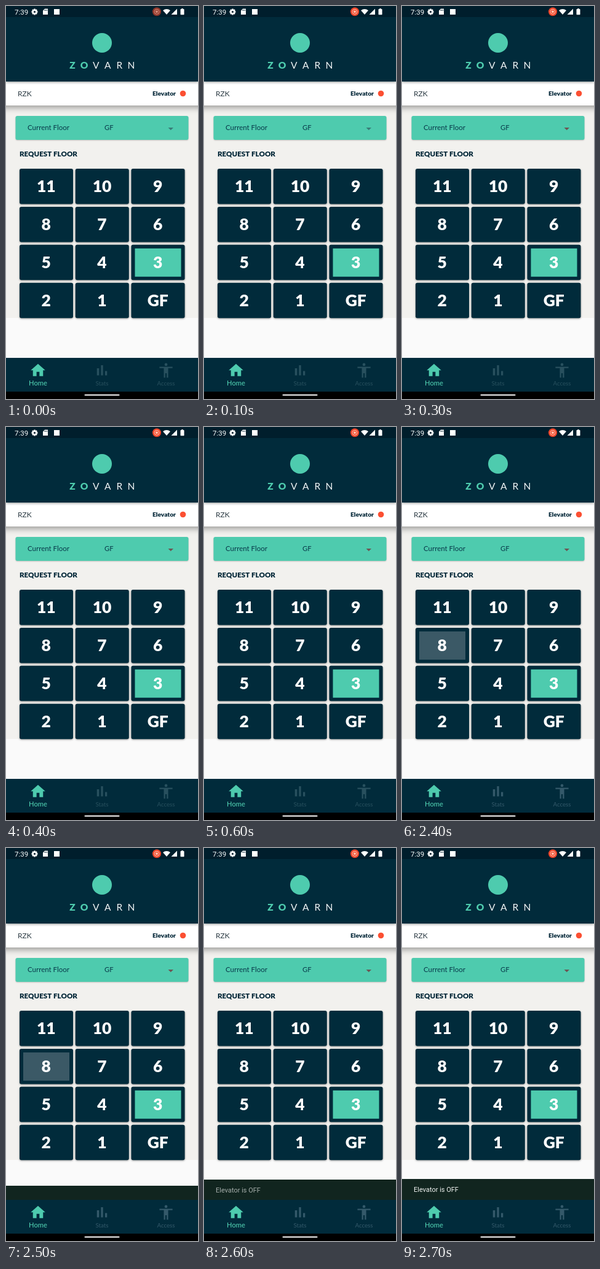
Recreate the animation shown at these times as an HTML page with a canvas. Size 312x640 px, loop 4 s.

```html
<!DOCTYPE html>
<html lang="en">
<head>
<meta charset="utf-8">
<title>Elevator panel</title>
<style>
  html, body { margin: 0; width: 100%; height: 100%; overflow: hidden; background: #012b3b; }
  canvas { display: block; width: 100vw; height: 100vh; }
</style>
</head>
<body>
<canvas id="stage" width="312" height="640"></canvas>
<script>
const ctx = document.getElementById('stage').getContext('2d');
const LOOP = 4000, STEP = 100;
const NAVY = '#012b3b', TEAL = '#4ecbae', ORANGE = '#fb4f32';
const LATO = 'Lato, sans-serif', ROBOTO = 'Roboto, sans-serif';
const KEYS = ['11', '10', '9', '8', '7', '6', '5', '4', '3', '2', '1', 'GF'];

const homeIcon = new Path2D('M10 20v-6h4v6h5v-8h3L12 3 2 12h3v8z');
const statsIcon = new Path2D('M5 9.2h3V19H5zM10.6 5h2.8v14h-2.8zM16.2 13H19v6h-2.8z');
const accessIcon = new Path2D('M12 2a2 2 0 1 1 0 4a2 2 0 1 1 0-4zM21 9h-6v13h-2v-6h-2v6H9V9H3V7h18z');

function rect(x, y, w, h, color) {
  ctx.fillStyle = color;
  ctx.fillRect(x, y, w, h);
}

function rounded(x, y, w, h, r, color) {
  ctx.fillStyle = color;
  ctx.beginPath();
  ctx.roundRect(x, y, w, h, r);
  ctx.fill();
}

function circle(x, y, r, color) {
  ctx.fillStyle = color;
  ctx.beginPath();
  ctx.arc(x, y, r, 0, Math.PI * 2);
  ctx.fill();
}

function polygon(color, ...points) {
  ctx.fillStyle = color;
  ctx.beginPath();
  points.forEach(([x, y]) => ctx.lineTo(x, y));
  ctx.fill();
}

function text(str, x, y, size, color, weight = 400, align = 'left', family = LATO) {
  ctx.font = `${weight} ${size}px ${family}`;
  ctx.textAlign = align;
  ctx.fillStyle = color;
  ctx.fillText(str, x, y);
}

function withShadow(blur, offset, alpha, draw) {
  ctx.save();
  ctx.shadowColor = `rgba(0,0,0,${alpha})`;
  ctx.shadowBlur = blur;
  ctx.shadowOffsetY = offset;
  draw();
  ctx.restore();
}

// Material standard curve: cubic-bezier(.4, 0, .2, 1)
function fastOutSlowIn(x) {
  if (x <= 0) return 0;
  if (x >= 1) return 1;
  const bezier = (a, b, u) => 3 * a * u * (1 - u) ** 2 + 3 * b * u * u * (1 - u) + u ** 3;
  let low = 0, high = 1;
  for (let i = 0; i < 24; i++) {
    const mid = (low + high) / 2;
    if (bezier(0.4, 0.2, mid) < x) low = mid; else high = mid;
  }
  return bezier(0, 1, low);
}

function drawGear(x, y) {
  ctx.save();
  ctx.translate(x, y);
  for (let i = 0; i < 4; i++) {
    rect(-1.3, -5, 2.6, 10, '#fff');
    ctx.rotate(Math.PI / 4);
  }
  ctx.restore();
  circle(x, y, 3.8, '#fff');
  circle(x, y, 1.6, '#001e2c');
}

function drawStatusBar(t) {
  rect(0, 0, 312, 18, '#001e2c');
  text('7:39', 14, 14, 11.5, '#fff', 400, 'left', ROBOTO);
  drawGear(46.5, 9.5);
  polygon('#fff', [63, 4.5], [68, 4.5], [68, 14], [60, 14], [60, 7.5]);
  for (let i = 0; i < 3; i++) rect(62.4 + i * 1.8, 6, 0.8, 2, '#001e2c');
  rect(78, 5, 9, 9, '#fff');

  ctx.globalAlpha = t < 100 ? 0.6 : 1;
  circle(245, 9.3, 7, '#f2472c');
  ctx.strokeStyle = '#ffc2ae';
  ctx.lineWidth = 1;
  ctx.beginPath();
  ctx.arc(245, 9.3, 4, 0, Math.PI * 2);
  ctx.stroke();
  circle(245, 9.3, 2, '#ffc2ae');
  ctx.globalAlpha = 1;

  ctx.fillStyle = '#fff';
  ctx.beginPath();
  ctx.moveTo(261, 14);
  ctx.arc(261, 14, 9, -Math.PI * 0.73, -Math.PI * 0.27);
  ctx.fill();
  polygon('#fff', [278, 4.5], [278, 14], [268.5, 14]);
  rounded(283.5, 5, 6, 9.3, 0.7, '#fff');
  rect(285.2, 4, 2.6, 1, '#fff');
}

function drawHeader() {
  withShadow(4, 1, 0.45, () => rect(0, 18, 312, 105, NAVY));
  circle(156, 60, 16, TEAL);
  [...'ZOVARN'].forEach((letter, i) => {
    const bold = i < 2;
    text(letter, 108 + i * 19.1, 102, 15.5, bold ? TEAL : '#f4f7f8', bold ? 900 : 400, 'center');
  });
}

function drawInfoBar() {
  withShadow(10, 3, 0.4, () => rect(-10, 122, 332, 40, '#fff'));
  text('RZK', 19, 147, 12, '#2c3b44');
  text('Elevator', 276, 146, 10.2, '#002536', 900, 'right');
  circle(287.5, 142.5, 4.8, ORANGE);
}

function drawFloorPicker(t) {
  withShadow(2, 1, 0.2, () => rounded(15.5, 179, 281, 39, 3, TEAL));
  text('Current Floor', 35, 202, 11.5, '#08394a');
  text('GF', 160, 202, 11.2, '#08394a');
  polygon(t < 300 ? '#397d78' : '#6d5654', [263.5, 198], [272, 198], [267.75, 202.3]);
  text('REQUEST FLOOR', 22, 245, 11.6, '#002536', 900);
}

function drawKeys(pressed) {
  KEYS.forEach((label, i) => {
    const x = 22 + (i % 3) * 90.75;
    const y = 265 + Math.floor(i / 3) * 61.9;
    withShadow(3, 1, 0.4, () => rounded(x, y, 87, 57.5, 3, NAVY));
    const inner = label === '3' ? TEAL : label === pressed ? '#3b5966' : null;
    if (inner) rect(x + 6, y + 6, 75, 46, inner);
    text(label, x + 43.3, y + 37.8, 26.5, '#fff', 900, 'center');
  });
}

function drawTab(icon, label, x, color, size, weight) {
  ctx.save();
  ctx.translate(x - 12 * 1.18, 579.2);
  ctx.scale(1.18, 1.18);
  ctx.fillStyle = color;
  ctx.fill(icon);
  ctx.restore();
  text(label, x, 618, size, color, weight, 'center');
}

function drawNav(t) {
  rect(0, 573, 312, 55, NAVY);
  const idle = t < 2200 ? '#28505e' : '#34596a';
  drawTab(homeIcon, 'Home', 52, TEAL, 11.2, 500);
  drawTab(statsIcon, 'Stats', 156, idle, 9.8, 400);
  drawTab(accessIcon, 'Access', 260, idle, 9.7, 400);
  rect(0, 628, 312, 12, '#000');
  rounded(127.5, 632.5, 57, 2, 1, '#fff');
}

function drawSnackbar(t) {
  const elapsed = t - 2390;
  if (elapsed <= 0) return;
  const top = Math.round(573 - 34 * fastOutSlowIn(elapsed / 250));
  rect(0, top, 312, 573 - top, '#11251f');
  const fade = (elapsed - 110) / 150;
  ctx.globalAlpha = Math.max(0, Math.min(1, fade));
  text('Elevator is OFF', 19, top + 21, 11, '#f0f3f1', 400, 'left', ROBOTO);
  ctx.globalAlpha = 1;
}

function draw(t) {
  rect(0, 0, 312, 640, '#fafafa');
  rect(0, 162, 312, 346, '#f2f1ee');
  drawInfoBar();
  drawHeader();
  drawStatusBar(t);
  drawFloorPicker(t);
  drawKeys(t >= 2400 && t < 2600 ? '8' : null);
  drawSnackbar(t);
  drawNav(t);
}

const start = performance.now();
function frame() {
  const time = (performance.now() - start) % LOOP;
  draw(Math.floor(time / STEP) * STEP);
  requestAnimationFrame(frame);
}
frame();
</script>
</body>
</html>
```
